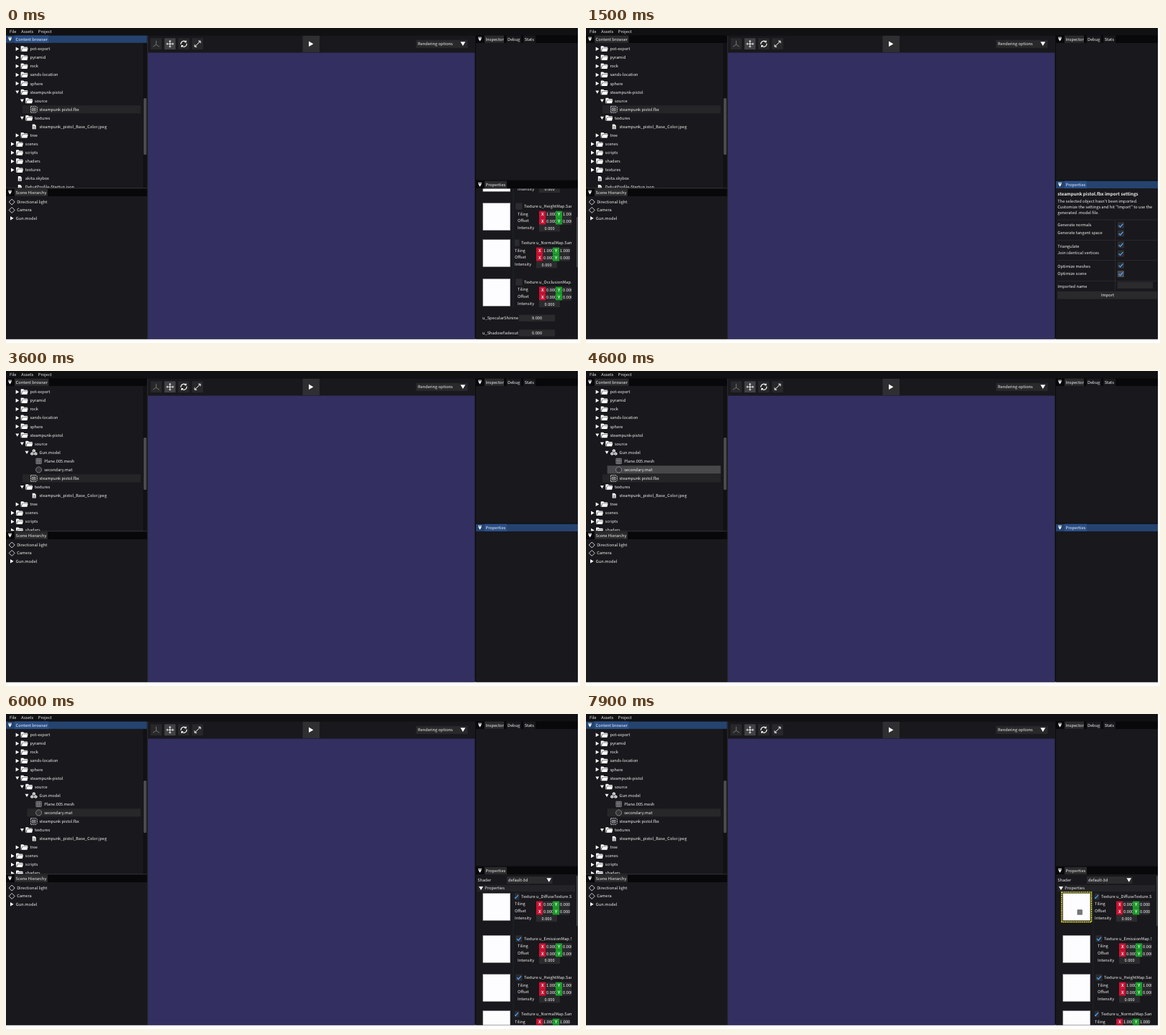
These frames come from a looping animation (800 px wide and 440 px high, 8 s). An HTML page:

```html
<!DOCTYPE html>
<html lang="en">
<head>
<meta charset="utf-8">
<title>Editor: importing a model</title>
<style>
  html, body { margin: 0; width: 100%; height: 100%; overflow: hidden; background: #fff; }
  svg { display: block; width: 800px; height: 440px; }
  text { font: 5.7px "Noto Sans CJK JP", "Noto Sans CJK SC", "Noto Sans", sans-serif; fill: #f2f2f2;
         white-space: pre; text-rendering: geometricPrecision; }
  text.title { font-size: 6.2px; font-weight: 700; }
  text.axis { font-weight: 700; }
</style>
</head>
<body>
<svg id="stage" viewBox="0 0 800 440"></svg>
<script>
const LOOP = 8000;
const stage = document.getElementById('stage');
const PANEL = '#19181c', FIELD = '#2b2b2e', FOCUS = '#25436f', FOCUS_TAB = '#2b5088', TAB = '#2b2b2e';

// Drawing helpers; y of text and icons is the vertical centre.
const rect = (x, y, w, h, fill, extra = '') =>
  `<rect x="${x}" y="${y}" width="${w}" height="${h}" fill="${fill}" ${extra}/>`;
const path = (d, fill = '#fff', stroke = 'none', width = 1, extra = '') =>
  `<path d="${d}" fill="${fill}" stroke="${stroke}" stroke-width="${width}" ${extra}/>`;
const line = (d, width = 0.9, color = '#fff') => path(d, 'none', color, width);
const text = (x, y, s, anchor = 'start', cls = '') =>
  `<text x="${x}" y="${y + 2}" text-anchor="${anchor}" class="${cls}">${s}</text>`;
const at = (x, y, s) => `<g transform="translate(${x} ${y})">${s}</g>`;
const clip = (id, s) => `<g clip-path="url(#${id})">${s}</g>`;
const clipRect = (id, x, y, w, h) => `<clipPath id="${id}">${rect(x, y, w, h, '#000')}</clipPath>`;
const rightArrow = (x, y) => path(`M${x} ${y - 2.7}l4.6 2.7l-4.6 2.7z`);
const downArrow = (x, y, w = 5) => path(`M${x} ${y - w * 0.42}h${w}l${-w / 2} ${w * 0.85}z`);

const icons = {
  folder: path('M0-3.4q0-.5.5-.5h3l1.2 1.2h4.2q.6 0 .6.6v.6H2L.6 2.2V3.6H.4Q0 3.6 0 3zM2.3-1H10L8.8 3.6H1z'),
  file: path('M2.8-3.4H6L7.8-1.6V3.4H2.8z') + line('M3.9-.3h2.8M3.9 1h2.8M3.9 2.2h2.8', 0.5, PANEL),
  asset: path('M.6-4.4H8L9.4-3V2.6L7.8 4.4H.6z', 'none', '#ddd', 0.8, 'stroke-dasharray="2.2 .6"') +
    rect(2.7, -1.9, 4.3, 4, 'none', 'stroke="#ddd" stroke-width=".7"') + line('M3.4 0H6.3M4.8-1.3V1.4', 0.5),
  model: [[4.9, -2.3], [2.4, 1.8], [7.4, 1.8]].map(([x, y]) =>
    at(x, y, path('M0-2.2L2.1-1.1V1.1L0 2.2L-2.1 1.1V-1.1z') + line('M-1.6-.8L0 0L1.6-.8M0 0V1.7', 0.5, PANEL))).join(''),
  mesh: line('M1.4-3.6H8.6V3.6H1.4zM3.8-3.6V3.6M6.2-3.6V3.6M1.4-1.2H8.6M1.4 1.2H8.6', 0.55, '#ddd'),
  material: '<circle cx="5" r="4" fill="#36363a" stroke="#ccc" stroke-width=".8" stroke-dasharray="1 .6"/>',
};

// Tree rows: [depth, icon, name, arrow ('>' closed, 'v' open)]
const folder = (depth, name, arrow = '>') => [depth, 'folder', name, arrow];
const importedRows = [[3, 'model', 'Gun.model', 'v'], [4, 'mesh', 'Plane.005.mesh'], [4, 'material', 'secondary.mat']];
const treeRows = imported => [
  ...['pot-export', 'pyramid', 'rock', 'sands-location', 'sphere'].map(n => folder(1, n)),
  folder(1, 'steampunk-pistol', 'v'), folder(2, 'source', 'v'),
  ...(imported ? importedRows : []),
  [3, 'asset', 'steampunk pistol.fbx'],
  folder(2, 'textures', 'v'), [3, 'file', 'steampunk_pistol_Base_Color.jpeg'], folder(1, 'tree'),
  ...['scenes', 'scripts', 'shaders', 'textures'].map(n => folder(0, n)),
  [0, 'file', 'akita.skybox'], [0, 'file', 'DebutProfile-Startup.json'],
];

function tree(state) {
  const rows = treeRows(state.imported).map(([depth, icon, name, arrow], i) => {
    const y = 29.2 + i * 12.08, x = 6.65 * depth;
    const key = depth + name;
    const fill = key === state.hover ? '#48484b' : key === state.selected ? state.selectedFill : null;
    return (fill ? rect(3 + x, y - 5.7, 184.7 - x, 11.2, fill) : '') +
      (arrow === '>' ? rightArrow(7 + x, y) : arrow ? downArrow(6.6 + x, y) : '') +
      at(14 + x, y, icons[icon]) + text(26.8 + x * 0.99, y, name);
  });
  const bar = state.imported ? [93, 73] : [98, 79];
  return clip('treeClip', rows.join('') + rect(191, 21, 5.5, 203, '#111013') +
    rect(191.8, bar[0], 4, bar[1], '#4d4d50', 'rx="1.5"'));
}

function header(x, y, w, name, tabWidth, focused) {
  return rect(x, y, w, 10.3, focused ? FOCUS : '#08080a') +
    rect(x + 12, y, tabWidth, 10.3, focused ? FOCUS_TAB : TAB) +
    line(`M${x + 3} ${y + 2.6}h5`, 0.9) + downArrow(x + 3, y + 5.8) + text(x + 13.6, y + 5.3, name);
}

function checkbox(x, y, on, hovered) {
  return rect(x, y - 4.6, 9.2, 9.2, hovered ? '#4a4a4e' : '#2c2c30') +
    (on ? line(`M${x + 1.7} ${y + 0.2}l2.1 2.2l3.9-4.5`, 1.3, '#4a9cf0') : '');
}

const numberField = (x, y, w, value) => rect(x, y - 4.6, w, 9.2, FIELD) + text(x + w / 2, y, value, 'middle');

function vectorField(x, y, value) {
  const axis = (ax, color, name) => rect(ax, y - 4.7, 9.4, 9.4, color) + text(ax + 4.7, y, name, 'middle', 'axis') +
    rect(ax + 9.4, y - 4.7, 14, 9.4, FIELD) + text(ax + 10, y, value);
  return axis(x, '#cb1233', 'X') + axis(x + 23, '#1c9e2b', 'Y');
}

// [name, top, tiling, narrow column]
const textures = [
  ['DiffuseTexture', 250.5, '0.000', true], ['EmissionMap', 309.3, '0.000', false],
  ['HeightMap', 363.6, '1.000', false], ['NormalMap', 414.6, '1.000', true], ['OcclusionMap', 469.4, '0.000', false],
];

function materialPanel(scroll, checked, dropTarget) {
  const thumbs = textures.map(([, top]) =>
    rect(664.8, top, 38, 38, '#fdfcff', 'stroke="#8c8c90" stroke-width=".5"')).join('');
  const fields = textures.map(([name, top, tiling, narrow]) => {
    const dx = narrow ? -4 : 0, y = top + 4.5;
    return checkbox(710.3 + dx, y, checked) + text(722 + dx, y, `Texture u_${name}.Sampler`) +
      ['Tiling', 'Offset', 'Intensity'].map((s, i) => text(713 + dx, y + [10.4, 20, 29.7][i], s)).join('') +
      vectorField(743 + dx, y + 11.2, tiling) + vectorField(743 + dx, y + 20.8, '0.000') +
      numberField(743 + dx, y + 30.6, 29, '0.000');
  }).join('');
  const top = text(657.3, 231.8, 'Shader') + rect(698, 227, 63.5, 10, FIELD) + text(700, 232, 'default-3d') +
    downArrow(753.5, 232, 6.5) + rect(657, 239, 136, 9, '#242428') + downArrow(659, 243.5, 6) + text(667.3, 243.4, 'Properties');
  const target = dropTarget ? rect(662.9, 248.9, 41.6, 41.6, 'none', 'stroke="#222" stroke-width="1.4"') +
    rect(662.9, 248.9, 41.6, 41.6, 'none', 'stroke="#f4f41c" stroke-width="1.4" stroke-dasharray="2 .7"') : '';
  const extras = text(664, 524, 'u_SpecularShinine') + numberField(715, 524.2, 50, '8.000') +
    text(664, 545, 'u_ShadowFadeout') + numberField(715, 545, 50, '0.000');
  return clip('propsClip', `<g transform="translate(0 ${-scroll})">` + top + thumbs + target +
    line('M707 250V510', 0.5, '#26303f') + extras + '</g>') +
    clip('fieldClip', `<g transform="translate(0 ${-scroll})">${fields}</g>`) +
    rect(795, 226 + scroll * 0.32, 1.6, 70, '#4d4d50');
}

function importPanel(state) {
  const options = ['Generate normals', 'Generate tangent space', 'Triangulate', 'Join identical vertices',
    'Optimize meshes', 'Optimize scene'];
  const labelY = [275, 286, 304.8, 314.4, 333.3, 342.8], boxY = [275.6, 286.8, 302.8, 315, 331.4, 343.4];
  return text(657.3, 231.8, 'steampunk pistol.fbx import settings', 'start', 'title') +
    ['The selected object hasn\'t been imported.', 'Customize the settings and hit "Import" to use the',
      'generated .model file.'].map((s, i) => text(657.3, 241.5 + i * 8.3, s)).join('') +
    line('M657 268H796M657 296.5H796M657 324.5H796M657 353.5H796M737.5 268V366', 0.6, '#333337') +
    options.map((s, i) => text(657.3, labelY[i], s) + checkbox(740.8, boxY[i], i < state.checks, i === state.hoverBox)).join('') +
    text(657.3, 361.4, 'Imported name') + rect(740.5, 354.8, 49.5, 9, FIELD) + text(742, 359.2, state.typed) +
    (state.caret ? rect(742.2, 356, 0.5, 6.5, '#ddd') : '') +
    rect(657, 367.8, 139.5, 10.8, state.button) + text(727, 373.2, 'Import', 'middle');
}

function toolbar() {
  const button = (x, fill, d, width) => rect(x, 14.3, 15.5, 15.7, fill) + at(x + 7.8, 22.2, line(d, width));
  return rect(198, 10.5, 456, 24, PANEL) +
    at(0, 0, rect(201.5, 14.3, 15.5, 15.7, '#28282b') + at(209.3, 22.2, line('M0-4.5V1L-4.5 4M0 1L4.5 4', 0.6, '#aaa'))) +
    button(220.8, '#424245', 'M-4.6 0H4.6M0-4.6V4.6M-3.3-1.4L-4.8 0L-3.3 1.4M3.3-1.4L4.8 0L3.3 1.4M-1.4-3.3L0-4.8L1.4-3.3M-1.4 3.3L0 4.8L1.4 3.3', 0.9) +
    button(240, '#28282b', 'M-4 .6A4 4 0 0 1 2.7-2.9M4-.6A4 4 0 0 1-2.7 2.9M3.2-4.6V-2.4H1M-3.2 4.6V2.4H-1', 1.1) +
    button(259.2, '#28282b', 'M-3.8 3.8L3.8-3.8M1-4H4V-1M-1 4H-4V1', 1) +
    rect(413.5, 10.8, 23.5, 23, '#2f2f32') + path('M422 18.6l6.4 3.7l-6.4 3.7z') +
    rect(571.5, 16.8, 72, 11, '#29292c') + text(574, 22.2, 'Rendering options') + downArrow(633.4, 22.2, 6.8);
}

function sceneHierarchy() {
  const diamond = y => line(`M8.2 ${y - 4}l4 4l-4 4l-4-4z`, 0.8);
  return header(0, 224.6, 196.5, 'Scene Hierarchy', 46, false) +
    diamond(243) + text(15.2, 243, 'Directional light') + diamond(254.4) + text(15.2, 254.4, 'Camera') +
    rightArrow(6, 265.7) + text(13.8, 265.7, 'Gun.model');
}

function inspector() {
  return header(655, 10.5, 142, 'Inspector', 27, false) +
    rect(697.5, 10.5, 20.5, 10.3, PANEL) + text(699, 15.8, 'Debug') +
    rect(721, 10.5, 17, 10.3, PANEL) + text(722.7, 15.8, 'Stats');
}

// Value of the last [start, value] step reached at time t.
const step = (t, ...steps) => steps.reduce((v, [start, next]) => (t >= start ? next : v), null);

function scene(t) {
  const imported = t >= 3500;
  const panel = step(t, [0, 'old'], [100, 'import'], [3500, 'empty'], [4800, 'material']);
  const propsFocused = t >= 1200 && t < 4800;
  const treeState = {
    imported,
    selected: t < 4800 ? '3steampunk pistol.fbx' : '4secondary.mat',
    selectedFill: step(t, [0, '#252528'], [4800, '#202023'], [5600, '#27272a']),
    hover: step(t, [4400, '3Gun.model'], [4600, '4secondary.mat'], [4800, ''], [6600, '2textures'],
      [6800, '3steampunk_pistol_Base_Color.jpeg'], [7200, '']),
  };
  const importState = {
    checks: step(t, [0, 4], [1200, 5], [1500, 6]),
    hoverBox: step(t, [0, -1], [1000, 4], [1300, 5], [1800, -1]),
    typed: step(t, [0, ''], [2100, 'G'], [2300, 'Gu'], [2500, 'Gun']),
    caret: t >= 1800 && t < 2100,
    button: step(t, [0, '#2a2a2d'], [3100, '#48484b'], [3300, '#38383b']),
  };

  const drag = Math.min(1, (t - 7200) / 500);
  const ease = drag * drag * (3 - 2 * drag);
  const preview = drag >= 0
    ? rect(98 + 587 * ease, 182 + 91.7 * ease, 6.4, 6.4, '#77777a', 'stroke="#4a4a4d" stroke-width=".6"') : '';

  const properties = {
    old: () => materialPanel(119, false, false),
    import: () => importPanel(importState),
    empty: () => '',
    material: () => materialPanel(0, true, t >= 7600),
  }[panel]();

  return '<defs>' + clipRect('treeClip', 0, 21, 196.5, 202.3) + clipRect('propsClip', 655, 224.5, 142, 210) +
    clipRect('fieldClip', 709, 224.5, 79.2, 210) + '</defs>' +
    rect(0, 0, 797, 434.5, '#0b0b0d') + rect(0, 0, 797, 10.5, '#111113') +
    text(5, 5.4, 'File') + text(21.3, 5.4, 'Assets') + text(44.8, 5.4, 'Project') +
    rect(0, 20.8, 196.5, 202.7, PANEL) + rect(0, 223.5, 196.5, 0.8, '#48484b') + rect(0, 234.9, 196.5, 199.6, PANEL) +
    rect(196.5, 10.5, 1.5, 424, '#29292d') + toolbar() + rect(198, 34.4, 455.5, 400.1, '#332f60') +
    rect(655, 20.8, 142, 191.7, PANEL) + rect(655, 224, 142, 210.5, PANEL) +
    header(0, 10.5, 196.5, 'Content browser', 47.5, !propsFocused) + tree(treeState) + sceneHierarchy() +
    inspector() + header(655, 213.7, 142, 'Properties', 31, propsFocused) + properties + preview;
}

let shown = '';
function frame() {
  const next = scene(performance.now() % LOOP);
  if (next !== shown) stage.innerHTML = shown = next;
  requestAnimationFrame(frame);
}
frame();
</script>
</body>
</html>
```
